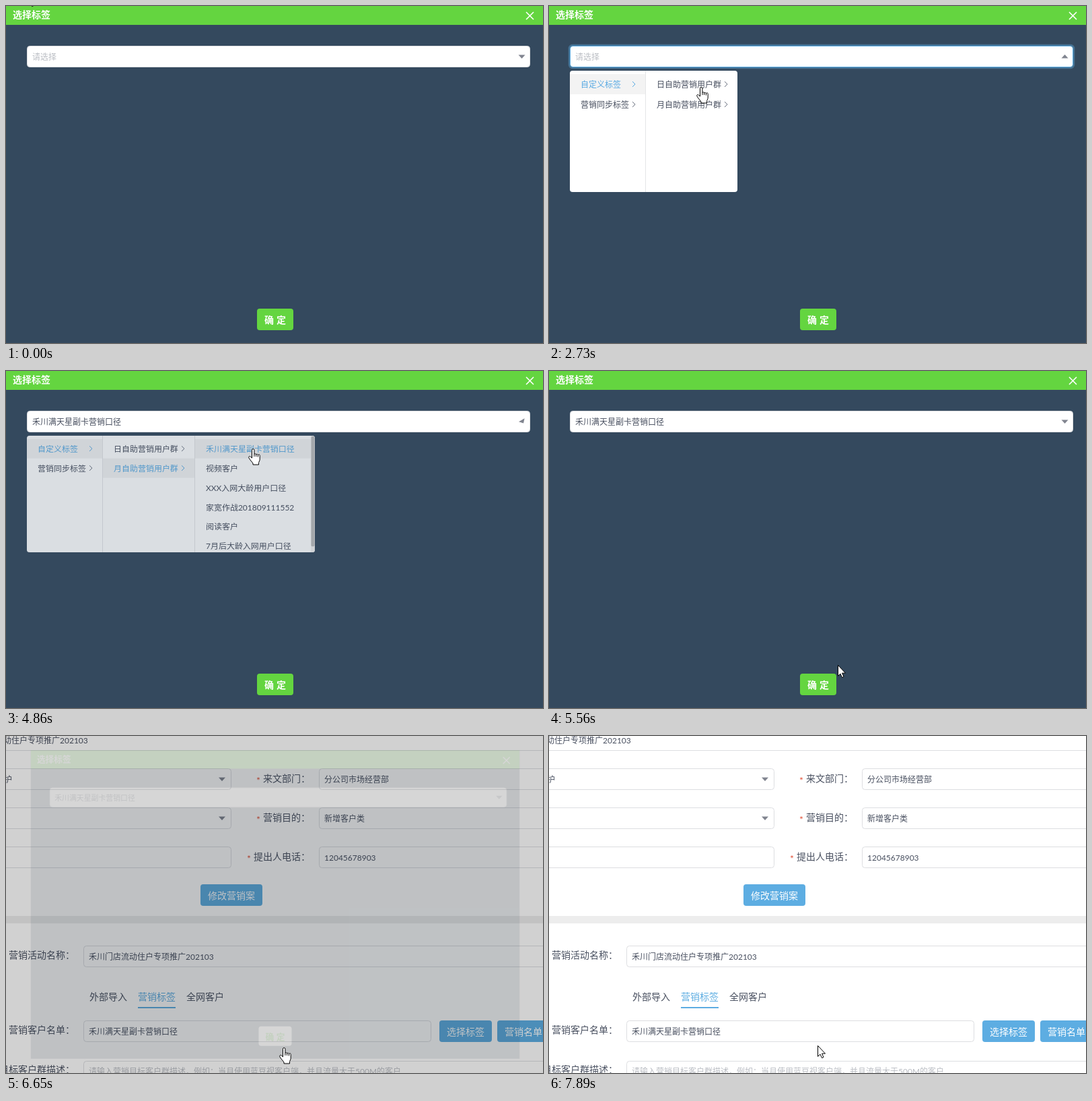
These frames come from a looping animation (798x500 px, 8 s). An HTML page:

```html
<!DOCTYPE html>
<html lang="zh-CN">
<head>
<meta charset="utf-8">
<title>选择标签</title>
<style>
  html, body { margin: 0; width: 100%; height: 100%; overflow: hidden; background: #fff; }
  svg { display: block; width: 798px; height: 500px; }
  text { font: 12px Lato, "Noto Sans CJK SC", "Noto Sans CJK JP", sans-serif; fill: #495060; white-space: pre; }
  .label { font-size: 14px; }
  .title { font-size: 14px; font-weight: 700; fill: #fff; }
  .btn { font-size: 14px; font-weight: 500; fill: #fff; }
  .hint { fill: #bbbec4; }
  .star { fill: #e04a2f; font-size: 14px; }
  .field { fill: #fff; stroke: #dddee1; }
  .blue { fill: #5dade2; }
  .caret { fill: #80848f; }
  .rule { stroke: #e4e5e7; }
  .chev { fill: none; stroke: #6b7280; }
  .row { fill: #f3f3f3; }
  .on text { fill: #57a9e3; }
  .on .chev { stroke: #57a9e3; }
  .row { visibility: hidden; }
  .on .row { visibility: visible; }
  #ok rect { fill: #64d540; }
  #ok.hover rect { fill: #fff; }
  #ok.hover text { fill: #64d540; }
  #arrow path, #hand path { fill: #fff; stroke: #000; stroke-linejoin: round; }
</style>
</head>
<body>
<svg viewBox="0 0 798 500">
  <defs>
    <path id="down" d="M-5-2.5H5L0 3Z"/>
    <clipPath id="popClip"><rect id="popShape" x="31" y="96" width="249" height="180" rx="4"/></clipPath>
  </defs>

  <g id="page">
    <rect width="798" height="500" fill="#fff"/>
    <path d="M0 21.5H798" stroke="#dddee1"/>
    <text x="-64" y="11">禾川门店流动住户专项推广202103</text>

    <g class="field">
      <rect x="-20.5" y="48.5" width="355" height="31" rx="4"/>
      <rect x="-20.5" y="106.5" width="355" height="31" rx="4"/>
      <rect x="-20.5" y="164.5" width="355" height="31" rx="4"/>
      <rect x="465.5" y="48.5" width="355" height="31" rx="4"/>
      <rect x="465.5" y="106.5" width="355" height="31" rx="4"/>
      <rect x="465.5" y="164.5" width="355" height="31" rx="4"/>
      <rect x="115.5" y="311.5" width="705" height="31" rx="4"/>
      <rect x="115.5" y="422.5" width="516" height="31" rx="4"/>
      <rect x="115.5" y="482.5" width="705" height="60" rx="4"/>
    </g>
    <use href="#down" class="caret" x="321" y="64"/>
    <use href="#down" class="caret" x="321" y="122"/>
    <text x="-3" y="69">护</text>

    <text class="star" x="372" y="71">*</text>
    <text class="star" x="372" y="129">*</text>
    <text class="star" x="358" y="187">*</text>
    <text class="label" x="382" y="68">来文部门：</text>
    <text class="label" x="382" y="126">营销目的：</text>
    <text class="label" x="368" y="184">提出人电话：</text>
    <text x="473" y="69">分公司市场经营部</text>
    <text x="473" y="127">新增客户类</text>
    <text x="473" y="185">12045678903</text>

    <rect class="blue" x="289" y="220" width="92" height="32" rx="4"/>
    <text class="btn" x="300" y="242">修改营销案</text>
    <rect y="267" width="798" height="11" fill="#ededed"/>

    <text class="label" x="4" y="330">营销活动名称：</text>
    <text x="123" y="332">禾川门店流动住户专项推广202103</text>
    <text class="label" x="124" y="392">外部导入</text>
    <text class="label blue" x="196" y="392">营销标签</text>
    <text class="label" x="268" y="392">全网客户</text>
    <rect class="blue" x="196" y="402" width="56" height="2"/>

    <text class="label" x="4" y="441">营销客户名单：</text>
    <text x="123" y="443">禾川满天星副卡营销口径</text>
    <rect class="blue" x="644" y="422" width="78" height="32" rx="4"/>
    <text class="btn" x="655" y="444">选择标签</text>
    <rect class="blue" x="730" y="422" width="106" height="32" rx="4"/>
    <text class="btn" x="741" y="444">营销名单导入</text>

    <text class="label" x="-10" y="500">目标客户群描述：</text>
    <text class="hint" x="123" y="502">请输入营销目标客户群描述，例如：当月使用蓝豆视客户端，并且流量大于500M的客户</text>
  </g>
  <rect id="shade" width="798" height="500"/>

  <g id="dialog">
    <rect y="-2" width="800" height="504" fill="#34495e"/>
    <rect y="-2" width="800" height="30" fill="#64d540"/>
    <text class="title" x="10" y="18">选择标签</text>
    <path d="M773 9L784 20M784 9L773 20" stroke="#fff" stroke-width="1.6"/>

    <rect id="glow" x="30" y="58" width="750" height="34" rx="5" fill="none" stroke="#5dade2" stroke-width="2.5"/>
    <rect id="box" x="31.5" y="59.5" width="747" height="31" rx="4" fill="#fff"/>
    <text id="value" x="39" y="80"></text>
    <use id="boxCaret" href="#down" class="caret"/>

    <g id="ok">
      <rect x="373" y="449" width="54" height="32" rx="4"/>
      <text class="title" x="384 402" y="471">确定</text>
    </g>

    <g id="popup">
      <g clip-path="url(#popClip)">
        <rect x="31" y="96" width="428" height="180" fill="#fff"/>
        <g id="menu"></g>
        <path class="rule" d="M143.5 96V276M280.5 96V276"/>
        <rect x="453" y="96" width="6" height="180" fill="#f1f1f1"/>
        <rect x="453.5" y="97" width="5" height="170" rx="2" fill="#bcbcbc"/>
      </g>
    </g>
  </g>

  <g id="arrow"><path d="M.5.5V16.5L4 13.2 6.6 18.7 9 17.6 6.6 12.2H11.5Z"/></g>
  <g id="hand">
    <path d="M5.5 14V2.3a1.7 1.7 0 0 1 3.4 0V8.6a1.5 1.5 0 0 1 2.8.4 1.5 1.5 0 0 1 2.7.7 1.5 1.5 0 0 1 2.8 1V16c0 2.6-1.7 3.6-1.7 5.6V24H7V22C5.4 19.6 2 16.400 .8 13.600c-.6-1.700 1.200-2.800 2.600-1.400Z"/>
    <path d="M8.900 8.600V12M11.700 9V12M14.400 9.700V12.500"/>
  </g>
</svg>

<script>
const $ = id => document.getElementById(id);
const LOOP = 8000;
const CHOICE = '禾川满天星副卡营销口径';

const columns = [
  { x: 31, w: 112, sub: true, items: ['自定义标签', '营销同步标签'] },
  { x: 144, w: 136, sub: true, items: ['日自助营销用户群', '月自助营销用户群'] },
  { x: 281, w: 172, items: [CHOICE, '视频客户', 'XXX入网大龄用户口径',
    '家宽作战201809111552', '阅读客户', '7月后大龄入网用户口径'] }
];

$('menu').innerHTML = columns.map((c, ci) => c.items.map((name, i) => {
  const y = 101 + 30 * i, end = c.x + c.w;
  const chevron = c.sub ? `<path class="chev" d="M${end - 19} ${y + 11}l4 4-4 4"/>` : '';
  return `<g id="item${ci}${i}"><rect class="row" x="${c.x}" y="${y}" width="${c.w}" height="30"/>` +
    `<text x="${c.x + 16}" y="${y + 20}">${name}</text>${chevron}</g>`;
}).join('')).join('');
$('item00').classList.add('on');

// Each track lists [start ms, ...values], held until the next entry.
const pointer = [
  [0, 'arrow', 32, -18], [560, 'arrow', 24, -12], [700, 'arrow', 20, 18],
  [830, 'hand', 69, 76], [980, 'hand', 76, 81], [2210, 'hand', 79, 100],
  [2330, 'hand', 82, 118], [2610, 'hand', 150, 119], [2730, 'hand', 219, 120],
  [2880, 'hand', 223, 145], [3700, 'hand', 291, 148], [3850, 'hand', 353, 143],
  [4000, 'hand', 359, 116], [4150, 'hand', 360, 115], [5130, 'arrow', 366, 115],
  [5280, 'arrow', 373, 165], [5410, 'arrow', 413, 319], [5560, 'arrow', 429, 436],
  [5700, 'hand', 411, 455], [5820, 'hand', 406, 462], [6770, 'arrow', 412, 463],
  [7890, 'arrow', 399, 459]
];
const popup = [ // opacity, vertical scale
  [0, 0, 1], [1380, .3, .6], [1500, .92, .983], [1660, 1, 1],
  [4860, .82, .961], [5010, .12, .3], [5130, 0, 1]
];
const focus = [ // border, glow opacity
  [0, '#dddee1', 0], [980, '#7dbde8', 0], [1380, '#5dade2', .25],
  [1500, '#5dade2', .4], [3150, '#9cc9e6', .15], [3270, '#dddee1', 0]
];
const caret = [ // x, angle
  [0, 766.5, 0], [1380, 766.5, 90], [1500, 766.5, 180], [4860, 767.5, -30], [5010, 766.5, 0]
];
const dialog = [ // opacity, scale, shade opacity
  [0, 1, 1, .5], [6380, .99, .998, .5], [6510, .83, .984, .44],
  [6650, .11, .908, .18], [6770, 0, .9, 0]
];

const at = (track, t) => track.filter(k => k[0] <= t).pop().slice(1);
const set = (id, attrs) => {
  for (const k in attrs) $(id).setAttribute(k, attrs[k]);
};

function draw(t) {
  const [kind, x, y] = at(pointer, t);
  for (const id of ['arrow', 'hand']) {
    set(id, { transform: `translate(${x} ${y})`, visibility: id === kind ? 'visible' : 'hidden' });
  }

  const [popAlpha, popScale] = at(popup, t);
  set('popup', { opacity: popAlpha, transform: `translate(0 96) scale(1 ${popScale}) translate(0 -96)` });
  set('popShape', { width: t < 3150 ? 249 : 428 });
  $('item11').classList.toggle('on', t >= 3150);
  $('item20').classList.toggle('on', t >= 4860);

  const [border, glow] = at(focus, t);
  set('box', { stroke: border });
  set('glow', { opacity: glow });
  const [cx, angle] = at(caret, t);
  set('boxCaret', { transform: `translate(${cx} 75) rotate(${angle})` });

  const picked = t >= 4860;
  $('value').textContent = picked ? CHOICE : '请选择';
  $('value').classList.toggle('hint', !picked);
  $('ok').classList.toggle('hover', t >= 5700);

  const [alpha, scale, shade] = at(dialog, t);
  set('dialog', { opacity: alpha, transform: `translate(400 250) scale(${scale}) translate(-400 -250)` });
  set('shade', { opacity: shade });
}

const start = performance.now();
function tick() {
  draw((performance.now() - start) % LOOP);
  requestAnimationFrame(tick);
}
tick();
</script>
</body>
</html>
```
